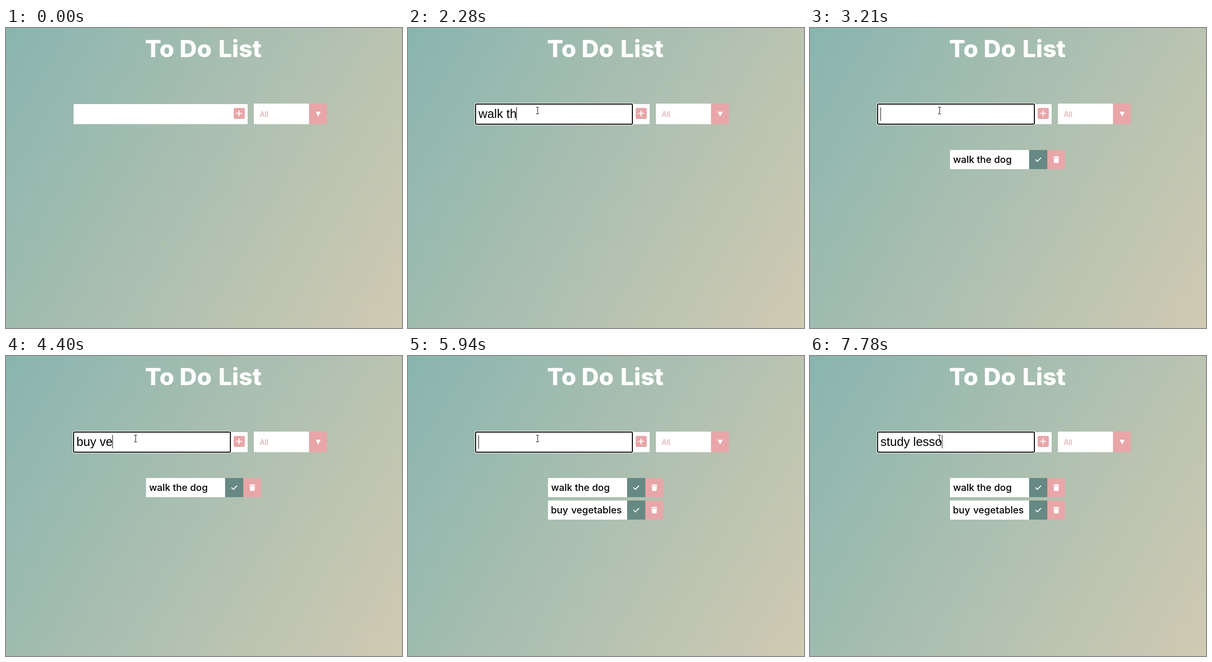
These frames come from a looping animation (826x627 px, 8 s). An HTML page:

```html
<!DOCTYPE html>
<html lang="en">
<head>
<meta charset="utf-8">
<title>To Do List</title>
<style>
html, body { margin: 0; width: 100%; height: 100%; overflow: hidden; }
body { position: relative; background: linear-gradient(120deg, #89b5af, #d0cab2); }
svg { position: absolute; left: 0; top: 0; width: 826px; height: 627px; font-family: Inter, sans-serif; }
.title { font-size: 50px; font-weight: 800; fill: #fff; }
.item { font-size: 20px; font-weight: 500; }
.choice { font-size: 15.5px; fill: #dba0a4; }
.pink { fill: #e8a6a8; }
.white { fill: #fff; }
#entry, #caret { position: absolute; left: 147px; top: 165px; height: 28px; }
#entry {
  font: 25.6px/28px "Liberation Sans", Arial, sans-serif;
  font-kerning: none;
  white-space: pre;
}
#caret { width: 1px; background: #000; }
</style>
</head>
<body>
<svg viewBox="0 0 826 627">
  <defs>
    <g id="buttons">
      <path class="white" d="M292 255h165v40h-165z"/>
      <path fill="#678983" d="M457 255h38v40h-38z"/>
      <path class="pink" d="M495 255h37v40h-37z"/>
      <path d="M470.8 275.4l3.5 3.5 7-7.4" fill="none" stroke="#fff" stroke-width="2" stroke-linecap="round" stroke-linejoin="round"/>
      <path class="white" d="M507.5 269h3.6l.7-1h4l.7 1h3.3v2h-12.3zM508.3 272h10.8l-.7 9q-.1 1-1.1 1h-7.2q-1 0-1.1-1z"/>
    </g>
  </defs>

  <text class="title" y="61"><tspan x="290">To</tspan><tspan x="362">Do</tspan><tspan x="443">List</tspan></text>

  <path class="white" d="M141 159h363v42h-363z"/>
  <g id="focus">
    <rect class="white" x="139" y="157" width="331" height="46" rx="3"/>
    <rect x="141" y="159" width="327" height="42" rx="2" fill="#fff" stroke="#000" stroke-width="2"/>
  </g>
  <path class="white" d="M469 159h35v42h-35z"/>
  <rect class="pink" x="475" y="167" width="23" height="23" rx="3"/>
  <path d="M480.5 178.5h11M486 173v11" stroke="#fff" stroke-width="2" stroke-linecap="round"/>

  <path class="white" d="M517 158h115v43h-115z"/>
  <path class="pink" d="M632 158h37.5v43h-37.5z"/>
  <path class="white" d="M646 175h10.5l-5.2 10z"/>
  <text class="choice" x="529" y="185.5">All</text>

  <g id="first">
    <use href="#buttons"/>
    <text class="item" y="282"><tspan x="298.5">walk</tspan><tspan x="348">the</tspan><tspan x="384">dog</tspan></text>
  </g>
  <g id="second">
    <use href="#buttons" y="47"/>
    <text class="item" y="329"><tspan x="298">buy</tspan><tspan x="340.5">vegetables</tspan></text>
  </g>
</svg>

<div id="entry"></div>
<div id="caret"></div>

<svg viewBox="0 0 826 627">
  <path id="arrow" d="M.5 .5v16l3.7-3.5 2.6 5.8 2.4-1-2.6-5.6h5.2z" fill="#fff" stroke="#000"/>
  <path id="beam" d="M-3-6.5h2.5l.5.5.5-.5h2.5M.5-6v13M-3 7.5h2.5l.5-.5.5.5h2.5" fill="none" stroke="#000"/>
</svg>

<script>
const LOOP = 8000, FOCUS = 610;
const $ = id => document.getElementById(id);

// Each phrase: moments at which its text grows, "|" parting the strokes.
const phrases = [
  { strokes: "w|a|l|k| |t|h|e| |d|o|g",
    times: [1220, 1280, 1480, 1610, 2010, 2150, 2280, 2410, 2540, 2610, 2740, 2810],
    shown: FOCUS, blink: 1080, end: 3210 },
  { strokes: "b|u|y| |ve|ge|t|a|b|l|e|s",
    times: [3610, 3740, 3870, 4000, 4400, 4600, 4740, 4870, 5010, 5140, 5260, 5460],
    shown: 3210, blink: 3340, end: 5940 },
  { strokes: "s|t|u|d|y| |l|e|s|s|o",
    times: [6130, 6390, 6590, 6860, 6980, 7120, 7310, 7380, 7590, 7680, 7780],
    shown: 5940, blink: 6010, end: LOOP }
];

const show = (id, on) => { $(id).style.display = on ? "" : "none"; };
const place = (id, x, y) => $(id).setAttribute("transform", `translate(${x} ${y})`);

function drawEntry(t) {
  const { strokes, times, shown, blink } = phrases.find(p => t < p.end);
  const count = times.filter(at => at <= t).length;
  const entry = $("entry"), caret = $("caret");
  entry.textContent = strokes.split("|").slice(0, count).join("");
  const width = count ? Math.floor(entry.getBoundingClientRect().width) : 0;
  caret.style.left = 147 + width + "px";
  caret.style.top = (count ? 165 : 166) + "px";
  show("caret", t >= shown && (count > 0 || t < blink));
}

function drawPointer(t) {
  const step = Math.min(6, Math.floor((t - 70) / 75));
  const left = (1 - step / 6) ** 1.6;
  const x = Math.round(270 + 334 * left), y = Math.round(172 + 276 * left);
  const inside = x > 141 && x < 469 && y > 159 && y < 201;
  show("arrow", t >= 70 && !inside);
  show("beam", t >= 70 && inside);
  place("arrow", x, y);
  place("beam", x, y);
}

function draw(t) {
  show("focus", t >= FOCUS);
  show("first", t >= 3210);
  show("second", t >= 5940);
  drawEntry(t);
  drawPointer(t);
}

const start = performance.now();
function tick() {
  draw((performance.now() - start) % LOOP);
  requestAnimationFrame(tick);
}
tick();
</script>
</body>
</html>
```
